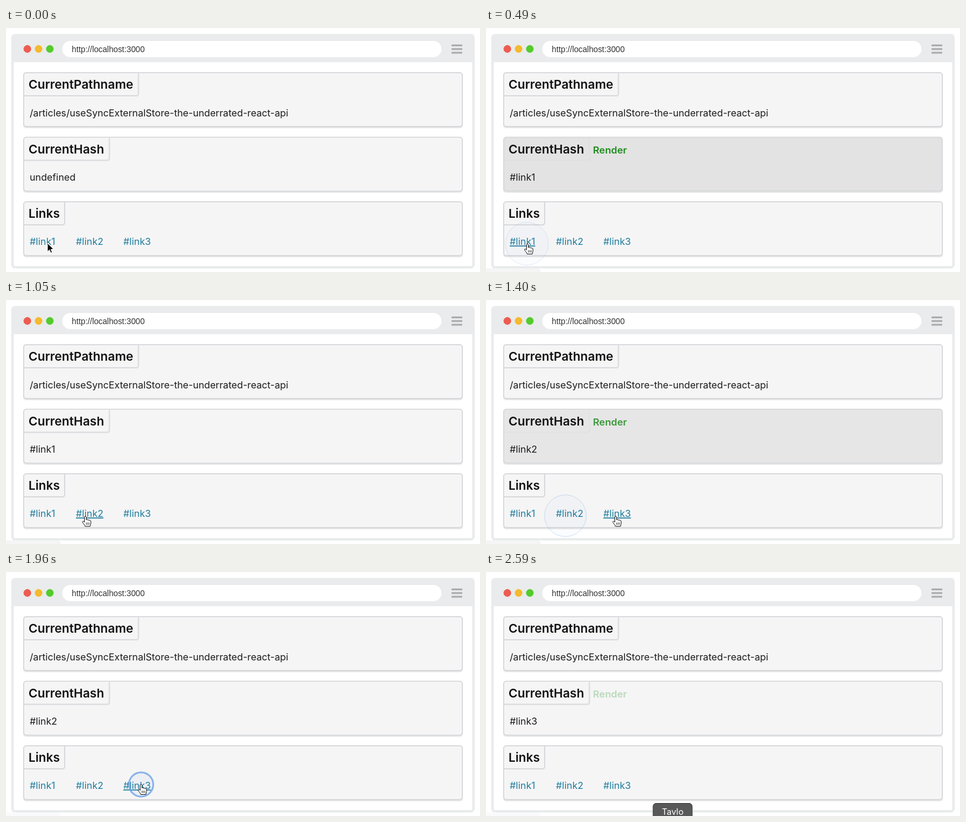
Write an HTML page that moves like this. It is 800 px wide and 414 px high and loops after 2660 ms.

```html
<!DOCTYPE html>
<html lang="en">
<head>
<meta charset="utf-8">
<title>Hash links</title>
<style>
  html, body { margin: 0; width: 100%; height: 100%; overflow: hidden; background: #fff; }
  svg { display: block; width: 800px; height: 414px; }
  text { font-family: Inter, "Open Sans", sans-serif; font-size: 16.2px; fill: #1b1b1b; }
  .title { font-size: 20.7px; font-weight: 600; fill: #111; }
  .url { font: 13.75px "Liberation Sans", Arial, sans-serif; fill: #333; }
  .link { fill: #1f7d9f; }
  .render { font-size: 16.6px; font-weight: 600; fill: #008000; }
  .tip { font-size: 14.5px; fill: #fff; text-anchor: middle; }
  .edge { fill: none; stroke: #d8d9dc; stroke-width: 2; }
  .glow { fill: none; stroke: #fff; stroke-opacity: .6; }
</style>
</head>
<body>
<svg viewBox="0 0 800 414">
  <rect x="9" y="10" width="782" height="398" rx="6" fill="#e9ebec"/>
  <path d="M13 58H787V401Q787 404 784 404H16Q13 404 13 401Z" fill="#fff"/>
  <circle cx="36" cy="35.5" r="6.4" fill="#ee5b4f"/>
  <circle cx="55" cy="35.5" r="6.4" fill="#f5b92e"/>
  <circle cx="74" cy="35.5" r="6.4" fill="#54cb2c"/>
  <rect x="95" y="22" width="640" height="27.5" rx="13.5" fill="#fff"/>
  <text class="url" x="111" y="40.5">http://localhost:3000</text>
  <path d="M752 29.5h18M752 35.8h18M752 42h18" stroke="#a9abad" stroke-width="3"/>
  <g id="cards"></g>
  <text x="40" y="149.5">/articles/useSyncExternalStore-the-underrated-react-api</text>
  <text id="hash" x="40" y="259"></text>
  <text id="render" class="render" x="180.5" y="212.5">Render</text>
  <g id="links"></g>
  <path id="status" d="M0 408H87Q92 408 93 414H0Z" fill="#f5f5f5"/>
  <circle id="ring" fill="#4c8fe0" fill-opacity=".06" stroke="#6ea3e6"/>
  <g id="tooltip">
    <rect x="282" y="392.5" width="66" height="30" rx="5" fill="#585858" stroke="#383838"/>
    <text class="tip" x="315" y="411.5">Tavlo</text>
  </g>
  <path id="arrow" d="M0 0V14.5L3.4 11.4 5.6 16.6 8 15.6 5.8 10.5H10.3Z" fill="#000" stroke="#fff"/>
  <g id="hand" stroke="#111" stroke-linejoin="round">
    <path fill="#fff" d="M-1.6 1.2C-1.6-.5 1.4-.5 1.4 1.2V6C2 5 4 5.2 4.2 6.6C5 5.8 6.8 6 6.9 7.4C7.6 6.8 9.2 7 9.2 8.6V12C9.2 14 8 15 8 17H-.6C-.8 15-3.4 12.5-4.6 10.6C-5.6 9-4 7.8-2.8 8.8L-1.6 10Z"/>
    <path d="M1.6 10.5v4M3.9 10.5v4M6.2 10.5v4" stroke-width=".8"/>
  </g>
</svg>
<script>
const LOOP = 2660, STEP = 70;
const $ = id => document.getElementById(id);
const clamp = v => Math.min(1, Math.max(0, v));
const mix = (a, b, k) => a + (b - a) * k;
const smooth = k => k * k * (3 - 2 * k);
const set = (el, attrs) => { for (const k in attrs) el.setAttribute(k, attrs[k]); };

const cards = [['CurrentPathname', 76, 223.5], ['CurrentHash', 185.5, 174.5], ['Links', 295, 99]];
$('cards').innerHTML = cards.map(([name, y, right]) => `
  <rect x="29" y="${y + 1.5}" width="742" height="92.5" rx="5" fill="#000" opacity=".1"/>
  <rect class="edge panel" x="30" y="${y}" width="740" height="91" rx="4" style="fill:#f5f5f5"/>
  <rect class="glow" x="31.5" y="${y + 1.5}" width="737" height="88" rx="3"/>
  <path class="edge label" d="M${right} ${y + 1}V${y + 35}q0 4-4 4H31"/>
  <text class="title" x="38" y="${y + 27}">${name}</text>`).join('');
const panel = document.querySelectorAll('.panel')[1];
const glow = document.querySelectorAll('.glow')[1];
const label = document.querySelectorAll('.label')[1];

const links = [[40, 84.5], [118, 164.5], [198, 245]];
$('links').innerHTML = links.map(([x], i) =>
  `<text class="link" x="${x}" y="368">#link${i + 1}</text>`).join('');
const linkEls = [...$('links').children];

// press time, ring centre, hash change time, label fade length
const clicks = [
  { press: 150, x: 69, y: 366, change: 405, fade: 640 },
  { press: 1120, x: 134, y: 366, change: 1225, fade: 700 },
  { press: 1925, x: 228, y: 360.5, change: 2010, fade: 760 }
];

// time, x, y of the pointer tip
const path = [
  [0, 70, 365], [70, 70, 366.5], [700, 70, 366.5], [1000, 134, 367], [1190, 134, 367],
  [1400, 219, 367], [1700, 228, 360.5], [2010, 228, 360.5], [2240, 315, 411], [2310, 315, 430], [LOOP, 315, 430]
];

function pointer(t) {
  const i = path.findIndex(p => p[0] > t);
  const [t0, x0, y0] = path[i - 1], [t1, x1, y1] = path[i];
  const k = smooth((t - t0) / (t1 - t0));
  return [mix(x0, x1, k), mix(y0, y1, k)];
}

function draw(t) {
  const [x, y] = pointer(t);
  const over = t < STEP || y > 374 ? -1 : links.findIndex(([a, b]) => x >= a && x <= b);
  linkEls.forEach((el, i) => el.style.textDecoration = i === over ? 'underline' : 'none');
  set($('arrow'), { transform: `translate(${x} ${y})`, visibility: over < 0 ? 'visible' : 'hidden' });
  set($('hand'), { transform: `translate(${x} ${y})`, visibility: over < 0 ? 'hidden' : 'visible' });

  const n = clicks.filter(c => t >= c.change).length, last = clicks[n - 1];
  $('hash').textContent = n ? '#link' + n : 'undefined';
  const age = last ? t - last.change : LOOP;
  const lit = 1 - smooth(clamp(age / 600));
  const grey = Math.round(mix(245, 226, lit));
  panel.style.fill = `rgb(${grey},${grey},${grey})`;
  set(glow, { opacity: 1 - lit });
  set(label, { opacity: 1 - .75 * lit });
  set($('render'), { opacity: last ? clamp(1 - age / last.fade) : 0 });

  const hit = clicks.find(c => t >= c.press && t < c.press + 370);
  set($('ring'), { opacity: 0 });
  if (hit) {
    const k = clamp((t - hit.press) / 370), out = 1 - (1 - k) ** 2;
    set($('ring'), {
      cx: hit.x, cy: hit.y, r: mix(17, 36.5, out),
      'stroke-width': mix(3.6, .6, out), opacity: mix(.85, .3, k)
    });
  }
  set($('status'), { opacity: t < 280 ? 0 : t < 1900 ? 1 : .5 });
  set($('tooltip'), { opacity: t >= 2380 ? 1 : 0 });
}

const start = performance.now();
function tick() {
  const t = (performance.now() - start) % LOOP;
  draw(Math.floor(t / STEP) * STEP);
  requestAnimationFrame(tick);
}
tick();
</script>
</body>
</html>
```
